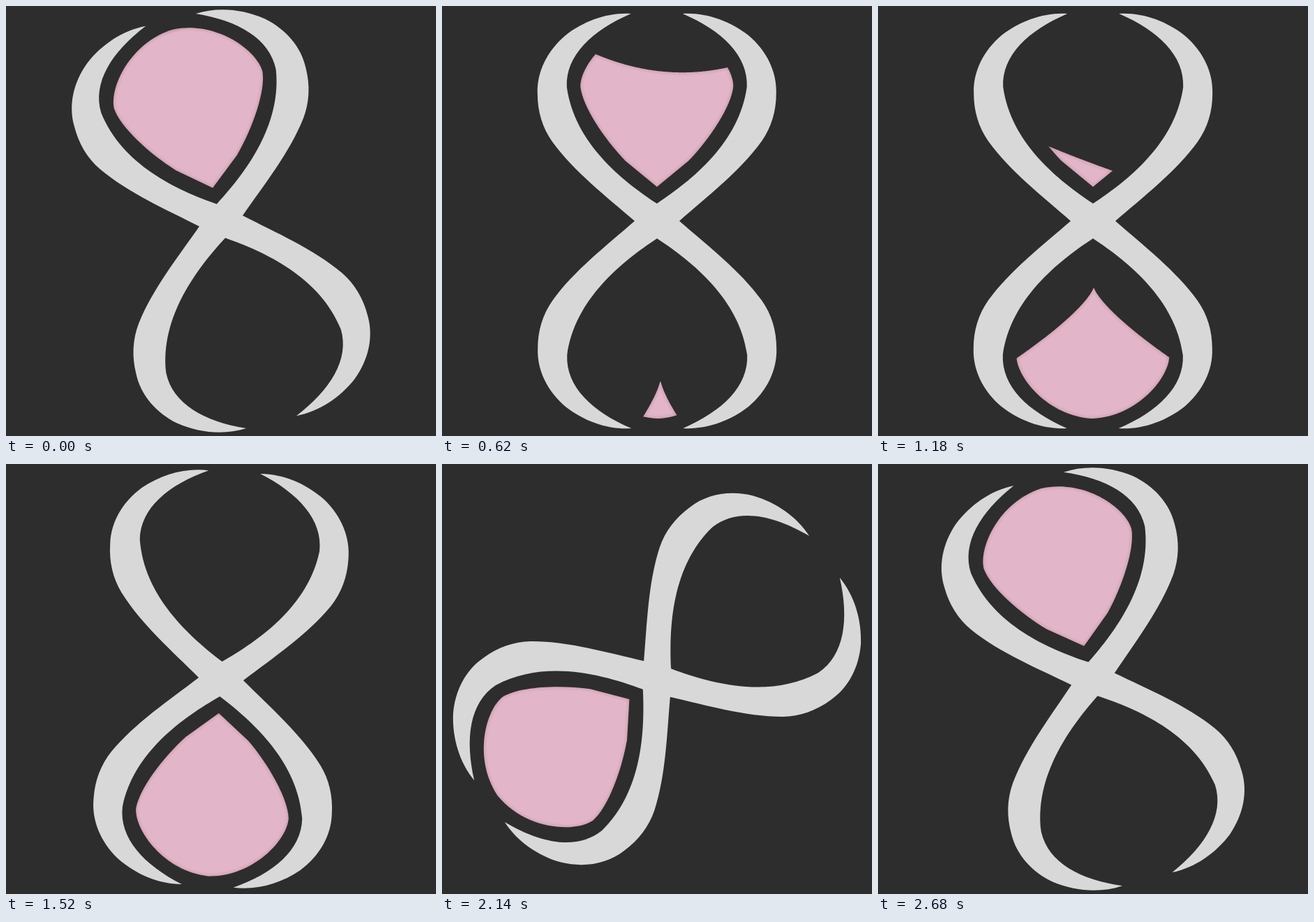
Write an HTML page with a canvas that moves like this. It is 616 px wide and 616 px high and loops after 2.7 s.

```html
<!DOCTYPE html>
<html lang="en">
<head>
<meta charset="utf-8">
<title>Hourglass</title>
<style>
  html, body { margin: 0; width: 100%; height: 100%; overflow: hidden; background: #2d2d2d; }
  canvas { display: block; width: 616px; height: 616px; }
</style>
</head>
<body>
<canvas width="616" height="616"></canvas>
<script>
const ctx = document.querySelector('canvas').getContext('2d');
const SIZE = 616, CENTER = SIZE / 2, LOOP = 2700;
const TURN_START = 1127, TURN_LENGTH = 2250;
const DRAIN_START = 335, FILL_START = 388, FLOW_LENGTH = 985;
const BULB_END = 283, BULB_NECK = 49;
const BACKDROP = '#2d2d2d', GLASS = '#d8d8d8', SAND = '#e2b6c8';

// All shapes are relative to the crossing point of the glass.
// A ribbon is one edge followed by the same edge turned by 180 degrees.
const edge = `C-70-299-104-287-131-266 C-157-244-172-214-171-183
  C-171-157-164-134-150-114 C-119-71-72-35-32 0 L0 25
  C50 58 118 112 129 192 C131 237 93 273 37 297`;
const turned = path => path.replace(/-?\d+/g, n => ' ' + -n);
const ribbon = new Path2D(`M-37-297 ${edge} ${turned(edge)}Z`);

const halfBulb = `M0-49 L-45-86 C-76-118-107-165-109.5-193
  C-109.5-224-64-280 0-283`;
const upperBulb = new Path2D(`${halfBulb}
  C64-280 109.5-224 109.5-193 C107-165 76-118 45-86Z`);
const lowerBulb = new Path2D();
lowerBulb.addPath(upperBulb, new DOMMatrix([1, 0, 0, -1, 0, 0]));

const mix = (from, to, amount) => from + (to - from) * amount;

// The falling sand surface tilts more and bows less as it sinks.
const surface = p => x =>
  mix(-BULB_END, -BULB_NECK, p) + 0.43 * p * x - 0.0024 * (1 - p) * x * x;

// The growing heap has a sharp peak and spreads out towards the end.
const heap = p => x =>
  mix(BULB_END, BULB_NECK, p) +
  4.75 * (1 - p ** 4.6) * Math.abs(x - 6 * (1 - p)) ** 0.75;

function trace(height) {
  const line = new Path2D();
  for (let x = -150; x <= 150; x++) line.lineTo(x, height(x));
  return line;
}

function drawSand(bulb, line) {
  ctx.save();
  ctx.clip(bulb);
  const below = new Path2D(line);
  below.lineTo(SIZE, SIZE);
  below.lineTo(-SIZE, SIZE);
  below.closePath();
  ctx.clip(below);
  ctx.fillStyle = SAND;
  ctx.fillRect(-CENTER, -CENTER, SIZE, SIZE);
  // Soft darker rim
  ctx.strokeStyle = 'rgba(130, 80, 100, 0.05)';
  for (let width = 3; width <= 9; width += 3) {
    ctx.lineWidth = width;
    ctx.stroke(bulb);
    ctx.stroke(line);
  }
  ctx.restore();
}

// Cubic bezier easing (x1, 0, 1 - x1, 1).
function ease(x) {
  const x1 = 0.795;
  let low = 0, high = 1, s = 0.5;
  for (let i = 0; i < 30; i++) {
    s = (low + high) / 2;
    const at = 3 * x1 * s * (1 - s) ** 2 + 3 * (1 - x1) * s * s * (1 - s) + s ** 3;
    if (at < x) low = s; else high = s;
  }
  return s * s * (3 - 2 * s);
}

function draw(time) {
  const sinceTurn = (time - TURN_START + LOOP) % LOOP;
  let angle = Math.PI * ease(Math.min(1, sinceTurn / TURN_LENGTH));
  if (time < TURN_START) angle -= Math.PI;

  ctx.setTransform(1, 0, 0, 1, 0, 0);
  ctx.fillStyle = BACKDROP;
  ctx.fillRect(0, 0, SIZE, SIZE);
  ctx.translate(CENTER, CENTER);
  ctx.rotate(angle);

  ctx.fillStyle = GLASS;
  ctx.fill(ribbon);
  ctx.save();
  ctx.scale(-1, 1);
  ctx.fill(ribbon);
  ctx.restore();

  const flow = start => Math.max(0, Math.min(1, (time - start) / FLOW_LENGTH));
  const drained = flow(DRAIN_START), filled = flow(FILL_START);
  if (drained < 1) drawSand(upperBulb, trace(surface(drained)));
  if (filled > 0) drawSand(lowerBulb, trace(heap(filled)));
}

function tick(now) {
  draw(now % LOOP);
  requestAnimationFrame(tick);
}
draw(0);
requestAnimationFrame(tick);
</script>
</body>
</html>
```
